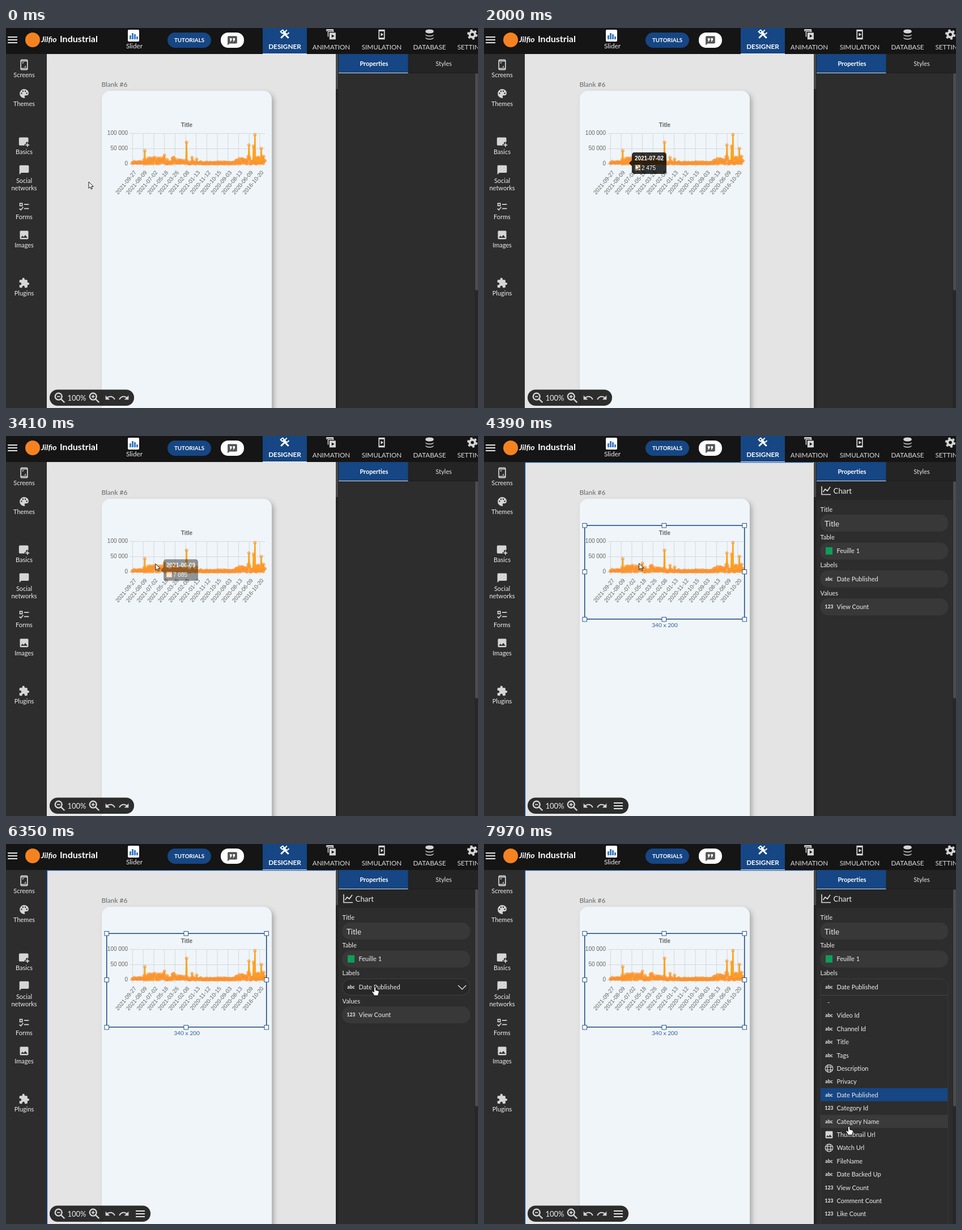
Animation of 833x672 px, one loop 8 s. Source, as an HTML page:

```html
<!DOCTYPE html>
<html lang="en">
<head>
<meta charset="utf-8">
<title>Chart designer</title>
<style>
  html, body { margin: 0; height: 100%; overflow: hidden; background: #2d2d2d; }
  svg { display: block; width: 100vw; height: 100vh; font-family: Lato, sans-serif; }
  .chart text { font-family: "Liberation Sans", Arial, sans-serif; font-size: 10px; fill: #666; }
  .chart .tip text { fill: #fff; }
</style>
</head>
<body>
<svg id="stage" viewBox="0 0 833 672"></svg>
<script>
const BLUE = '#164683', PANEL = '#2d2d2d', ICON = '#d6d6d6';

// Drawing helpers
const rect = (x, y, w, h, fill, more = '') =>
  `<rect x="${x}" y="${y}" width="${w}" height="${h}" fill="${fill}" ${more}/>`;
const text = (x, y, str, size = 11, fill = '#eee', more = '') =>
  `<text x="${x}" y="${y}" font-size="${size}" fill="${fill}" ${more}>${str}</text>`;
const mid = (x, y, str, size, fill, more = '') => text(x, y, str, size, fill, 'text-anchor="middle" ' + more);
const line = (d, color = '#fff', width = 1, more = '') =>
  `<path d="${d}" fill="none" stroke="${color}" stroke-width="${width}" ${more}/>`;
const group = (id, body, more = '') => `<g id="${id}" ${more}>${body}</g>`;
// Icons are drawn on a 24-unit square centred on (x, y)
const icon = (x, y, body, size = 20, color = ICON) =>
  `<g transform="translate(${x - size / 2} ${y - size / 2}) scale(${size / 24})" fill="${color}" fill-rule="evenodd">${body}</g>`;
const path = d => `<path d="${d}"/>`;
const hole = (x, y) => `M${x - 1.5} ${y}a1.5 1.5 0 1 0 3 0a1.5 1.5 0 1 0-3 0z`;

const ICONS = {
  phone: line('M7 1.5H17Q19 1.5 19 3.5V20.5Q19 22.5 17 22.5H7Q5 22.5 5 20.5V3.5Q5 1.5 7 1.5ZM5 4H19M5 20H19', ICON, 2),
  palette: path('M12 2.5a9.5 9.5 0 0 0 0 19c1.6 0 2.1-1.5 1.2-2.6-.9-1.3 0-2.9 1.5-2.9H17c3 0 4.5-2.3 4.5-5 0-5-4.5-8.5-9.5-8.5z'
    + hole(6.5, 11.5) + hole(9.5, 6.8) + hole(14.5, 6.8) + hole(17.5, 11.5)),
  basics: path('M3 3H19Q21 3 21 5V13H16V17H13V20H3Q1 20 1 18V5Q1 3 3 3ZM18 15H20V18H23V20H20V23H18V20H15V18H18Z'),
  bubble: path('M2 22V4Q2 2 4 2H20Q22 2 22 4V16Q22 18 20 18H6Z'),
  forms: path('M12 6H22V8H12ZM12 15H22V17H12Z') + line('M3 5H8V10H3ZM2 16L5 19 10 13', ICON, 2),
  image: path('M5 3H19Q21 3 21 5V19Q21 21 19 21H5Q3 21 3 19V5Q3 3 5 3ZM8.5 13.5L5 18H19L14.5 12 11 16.5Z'),
  puzzle: path('M20.5 11H19V7q0-2-2-2h-4V3.5a2.5 2.5 0 0 0-5 0V5H4q-2 0-2 2v3.8h1.5a2.7 2.7 0 0 1 0 5.4H2V20q0 2 2 2h3.8v-1.5a2.7 2.7 0 0 1 5.4 0V22H17q2 0 2-2v-4h1.5a2.5 2.5 0 0 0 0-5z'),
  undo: path('M12.5 8C9.8 8 7.5 9 5.6 10.6L2 7v9h9l-3.6-3.6c4-3.4 11-2 12.7 3.6l2.4-.8C21 11 17 8 12.5 8z'),
  zoom: line('M3 9.5a6.5 6.5 0 1 0 13 0a6.5 6.5 0 1 0-13 0M14.5 14.5L21 21', ICON, 2.6),
  globe: line('M2.5 12a9.5 9.5 0 1 0 19 0a9.5 9.5 0 1 0-19 0M8 12a4 9.5 0 1 0 8 0a4 9.5 0 1 0-8 0M3 8.5H21M3 15.5H21', ICON, 1.7),
  tools: line('M3 21L15 9M21 21L8 8', '#fff', 4) + line('M13 6a4 4 0 0 0 6 5l3-3M13 6l4-4M2 6L7 2 11 6 6 10Z', '#fff', 2.5),
  stack: line('M2 5V1H16V5M1 2H15M5 17V5H18', ICON, 2) + path('M8 8H22V23H8ZM13 12V19L19 15.5Z'),
  play: line('M6 2H18V22H6ZM6 4H18M6 20H18', ICON, 2.2) + path('M10 8V16L16 12Z'),
  database: [4, 11, 18].map((y, i) => path(`M3 ${y}a9 3.5 0 0 ${i ? 0 : 1} 18 0v2a9 3.5 0 0 1-18 0z`)).join(''),
  gear: `<circle cx="12" cy="12" r="6" fill="none" stroke="${ICON}" stroke-width="5"/>
    <circle cx="12" cy="12" r="9.5" fill="none" stroke="${ICON}" stroke-width="4" stroke-dasharray="5 4.95"/>`,
};

const typeIcon = (kind, y) => ICONS[kind] ? icon(609, y, ICONS[kind], 17)
  : kind === 'sheet' ? rect(603, y - 6.5, 12, 13, '#0f9d58')
  : mid(609, y + 3, kind, 8.5, ICON, 'font-weight="900"');
const entry = (y, kind, str) => typeIcon(kind, y) + text(622.5, y + 4, str);
const menuLines = (x, y, w) => line(`M${x} ${y}h${w}m-${w} 5h${w}m-${w} 5h${w}`, '#e4e4e4', 2);

function header() {
  const tabs = [[574, 'ANIMATION', 'stack'], [663, 'SIMULATION', 'play'], [747.5, 'DATABASE', 'database'], [823, 'SETTINGS', 'gear']];
  const bars = [7, 11, 9, 5].map((h, i) => rect(218 + 4 * i, 20 - h, 3, h, '#3b78c4')).join('');
  return rect(0, 0, 833, 46, '#151515') + menuLines(3, 16, 17)
    + '<circle cx="47" cy="21" r="13" fill="#f58220"/>'
    + text(62, 25, 'Jilfio', 14, '#fff', 'font-style="italic" font-weight="bold"')
    + text(95, 25, 'Industrial', 16, '#fff', 'font-weight="bold"')
    + rect(215, 3, 20, 21, '#fff', 'rx="2"') + bars
    + mid(226.5, 36, 'Slider', 11.7, '#eee')
    + rect(285, 8, 77, 27, BLUE, 'rx="13.5"') + mid(323.5, 25, 'TUTORIALS', 9.8, '#fff', 'font-weight="bold"')
    + rect(379, 8, 41, 27, '#fff', 'rx="13"') + icon(399.5, 22.5, ICONS.bubble, 20, '#555')
    + '<path d="M395 18h3.5v3l-2 3h-1.5l1-3h-1zm5.5 0h3.5v3l-2 3h-1.5l1-3h-1z" fill="#fff"/>'
    + rect(453, 0, 78, 46, BLUE) + rect(453, 45, 78, 1, '#e8eef6')
    + icon(492, 11, ICONS.tools, 18, '#fff') + mid(492, 36.5, 'DESIGNER', 11.8, '#fff', 'font-weight="bold"')
    + tabs.map(([x, name, key]) => icon(x, 11.5, ICONS[key], 19)
      + (key === 'gear' ? text(796.5, 38, name, 11.7, '#ddd') : mid(x, 38, name, 11.7, '#ddd'))).join('');
}

function sidebar() {
  const items = [[65, 'phone', 'Screens'], [116, 'palette', 'Themes'], [201, 'basics', 'Basics'], [251, 'bubble', 'Social'],
    [316, 'forms', 'Forms'], [366, 'image', 'Images'], [451, 'puzzle', 'Plugins']];
  return rect(0, 46, 72, 626, PANEL)
    + items.map(([y, key, name]) => icon(32, y, ICONS[key])
      + mid(32, y + (key === 'bubble' ? 23 : 22), name, 11, '#eee')).join('')
    + mid(32, 286.5, 'networks', 11, '#eee')
    + line('M29.5 63v-2h2M34.5 67v2h-2', ICON, 1.2);
}

function chartSeries() {
  let seed = 11;
  const random = () => (seed = (seed * 16807) % 2147483647) / 2147483647;
  // [right edge, lowest, highest] in pixels above the axis
  const bands = [[243, 1, 5], [302, 0, 11], [318, 1, 7], [345, 0, 5], [405, 0, 3], [425, 0, 9], [460, 0, 13]];
  const spikes = [[245, 23], [280, 15], [318.5, 38], [328.5, 11], [336, 8], [412, 9], [429, 33], [437, 31], [439, 51.5], [450.5, 27], [455, 13]];
  const points = Array.from({ length: 290 }, (_, i) => {
    const x = 223 + i * 0.81;
    const [, low, high] = bands.find(b => x < b[0]);
    const spike = spikes.find(s => Math.abs(s[0] - x) < 0.406);
    return [x, 240 - (spike ? spike[1] : low + random() ** 2 * (high - low))];
  });
  return line('M' + points.map(p => p.map(v => v.toFixed(1))).join('L'), '#fba41f', 2.5, 'stroke-linejoin="round"')
    + points.map(([x, y]) => `<circle cx="${x.toFixed(1)}" cy="${y.toFixed(1)}" r="2.5" fill="#ff9f4033" stroke="#fb9030" stroke-width=".8"/>`).join('');
}

function chart() {
  const dates = ['2021-09-27', '2021-08-09', '2021-07-02', '2021-05-18', '2021-03-26', '2021-02-08', '2021-01-13',
    '2020-11-12', '2020-10-15', '2020-09-03', '2020-08-13', '2020-06-09', '2016-10-20'];
  const columns = dates.map((date, i) => {
    const x = 223.5 + 18.7 * i;
    return line(`M${x} 186V246`, '#d3d9dc')
      + `<text transform="translate(${x + 4.5} 253.5) rotate(-50)" text-anchor="end" dy=".35em">${date}</text>`;
  }).join('');
  const rows = ['100 000', '50 000', '0'].map((label, i) =>
    line(`M218 ${186 + 27 * i}.5H457`, i < 2 ? '#d3d9dc' : '#b9c0c4')
    + text(215, 189 + 27 * i, label, 10, '#666', 'text-anchor="end"')).join('');
  return mid(319, 175, 'Title', 10, '#666', 'font-weight="bold"') + columns + rows + chartSeries();
}

function selection() {
  const handles = [[178, 158], [318, 158], [460, 158], [178, 240], [460, 240], [178, 324], [318, 324], [460, 324]];
  return line('M72.6 672V46.6H581', '#1f5cb0', 1.2) + line('M177.7 158.3H459.7V323.7H177.7Z', BLUE, 1.5)
    + handles.map(([x, y]) => rect(x - 4, y - 3.5, 7.5, 7.5, '#fff', `stroke="${BLUE}" stroke-width=".9"`)).join('')
    + mid(319, 338, '340 x 200', 10.2, '#315f9c');
}

const toolbar = () =>
  `<rect id="toolbar" x="77" y="639.5" width="149" height="28.5" rx="14" fill="${PANEL}"/>`
  + icon(95, 654, ICONS.zoom + line('M6.5 9.5h6', ICON, 2), 22) + text(108.5, 659, '100%', 13)
  + icon(156, 654, ICONS.zoom + line('M6.5 9.5h6M9.5 6.5v6', ICON, 2), 22) + line('M169.5 640V668', '#222')
  + icon(184, 654, ICONS.undo) + `<g transform="matrix(-1 0 0 1 416 0)">${icon(208, 654, ICONS.undo)}</g>`
  + group('menu', menuLines(229, 649, 16));

const sideTabs = () => rect(582, 46, 5, 626, '#252525') + rect(582, 46, 4, 62, '#484848')
  + rect(587, 46, 246, 626, PANEL) + rect(709, 46, 124, 33, '#242424') + rect(587, 79, 246, 1, '#1c1c1c')
  + rect(587, 46, 122.5, 33, BLUE) + rect(587, 79, 122.5, 1, '#d5deea')
  + mid(649.5, 67, 'Properties', 10.8, '#fff', 'font-weight="bold"') + mid(772.5, 67, 'Styles', 11, '#e4e4e4')
  + rect(827, 80, 6, 592, '#272727') + rect(828, 80, 5, 384, '#4c4c4c', 'rx="2"');

function properties() {
  const fields = [['Title'], ['Table', 'sheet', 'Feuille 1'], ['Labels', 'abc', 'Date Published'], ['Values', '123', 'View Count']];
  return rect(587, 80, 240, 33, '#262626') + line('M596 89V103.5H612M598.5 99L602 94 606 97 611 90', '#e0e0e0', 1.6)
    + text(616.5, 101.5, 'Chart', 13.3)
    + fields.map(([label, kind, value], i) => {
      const y = 154 + 49.4 * i;
      const box = rect(593.5, y - 15, 225.5, 30, '#383838', 'rx="14"');
      const hovered = i === 2 ? group('hover', rect(594, y - 14.5, 224.5, 29, '#282828', 'rx="14" stroke="#3f3f3f"')) : '';
      return text(593.5, y - 20.5, label) + box + hovered
        + (kind ? entry(y - 0.2, kind, value) : text(601, y + 6, label, 13.3));
    }).join('');
}

function dropdown() {
  const rows = [['', ''], ['abc', 'Video Id'], ['abc', 'Channel Id'], ['abc', 'Title'], ['abc', 'Tags'], ['globe', 'Description'],
    ['abc', 'Privacy'], ['abc', 'Date Published'], ['123', 'Category Id'], ['abc', 'Category Name'], ['image', 'Thumbnail Url'],
    ['globe', 'Watch Url'], ['abc', 'FileName'], ['abc', 'Date Backed Up'], ['123', 'View Count'], ['123', 'Comment Count'], ['123', 'Like Count']];
  return `<path d="M594 680V252Q594 239 608 239H805Q818.5 239 818.5 252V680Z" fill="${PANEL}" stroke="#383838"/>`
    + line('M594 267.5H818', '#454545') + entry(253, 'abc', 'Date Published')
    + '<rect id="rowHover" x="594" width="224" height="23.4" fill="#3a3a3a"/>'
    + rect(594, 431.6, 224, 23.4, BLUE)
    + rows.map(([kind, name], i) => name ? entry(280 + 23.4 * i, kind, name) : text(606, 284, '-')).join('');
}

const tooltip = () => '<path d="M-5 19L0 14V5Q0 0 5 0H56Q61 0 61 5V33Q61 38 56 38H5Q0 38 0 33V24Z" fill="#000" fill-opacity=".8"/>'
  + '<text id="tipDate" x="5" y="14" font-weight="bold"></text>'
  + rect(5.5, 22.5, 9, 9, '#ffe0cf', 'stroke="#ff9f40"') + '<text id="tipValue" x="17" y="31"></text>';

const stage = document.getElementById('stage');
stage.innerHTML = `<defs><filter id="shadow" x="-10%" y="-10%" width="120%" height="120%">
    <feDropShadow dx="4" dy="4" stdDeviation="4" flood-opacity=".25"/></filter></defs>`
  + rect(72, 46, 510, 626, '#e4e4e4') + text(168.5, 104, 'Blank #6', 11.9, '#666')
  + rect(169, 111, 300, 620, '#eff5f8', 'rx="15" filter="url(#shadow)"')
  + group('chart', chart(), 'class="chart"') + group('selection', selection())
  + group('tipLayer', group('tip', tooltip(), 'class="tip"'), 'class="chart"')
  + toolbar() + sideTabs() + group('properties', properties()) + group('dropdown', dropdown())
  + group('chevron', line('M798 250L805 257 812 250', '#e4e4e4', 1.3))
  + header() + sidebar()
  + group('arrow', '<path d="M0 0V11.5L2.7 9 4.5 13 6.3 12.2 4.6 8.4H8.2Z" fill="#fff" stroke="#000" stroke-width=".9"/>')
  + group('hand', '<path d="M-1.5.8Q0-.8 1.5.8V5.5L6 6.5Q7.6 7 7.3 9L6 12.5V15H-2V13L-5 9Q-5.5 7-3.5 7.5L-1.5 9Z" fill="#fff" stroke="#000" stroke-width=".8"/>');

// Motion: [time, x, y]
const CURSOR = [[0, 146, 272], [200, 146, 272], [400, 160, 267], [850, 219, 250], [1050, 229, 246], [1110, 230, 245], [1250, 236, 240],
  [1870, 261, 240], [2000, 267, 240], [2270, 246, 241], [2730, 285, 245], [3150, 285, 245], [3410, 264, 226], [3530, 254, 217],
  [3670, 264, 226], [4320, 264, 226], [4390, 273, 225], [4800, 523, 234], [5130, 523, 234], [5600, 638, 254], [5740, 645, 244],
  [6149, 645, 244], [6150, 652, 248], [6349, 652, 248], [6350, 651, 253], [6890, 651, 253], [7360, 660, 437], [7700, 660, 437],
  [7970, 644, 499.5], [8000, 644, 499.5]];
const TIP = [[0, 239, 219], [1250, 239, 219], [1870, 256, 220], [2000, 261, 220], [2270, 244, 219], [2730, 282, 219],
  [3200, 282, 219], [3340, 278, 218], [8000, 278, 218]];
const TIP_TEXT = [[0, '2021-08-26', '4 680'], [1480, '2021-07-20', '3 912'], [1800, '2021-07-02', '2 475'],
  [2130, '2021-07-26', '5 316'], [2400, '2021-06-24', '3 240'], [2600, '2021-06-09', '7 085']];

const ramp = (t, from, to) => Math.min(1, Math.max(0, (t - from) / (to - from)));
function along(keys, t) {
  const i = keys.findIndex(k => k[0] > t);
  const [t0, x0, y0] = keys[i - 1], [t1, x1, y1] = keys[i];
  const p = ramp(t, t0, t1);
  return [x0 + (x1 - x0) * p, y0 + (y1 - y0) * p];
}
const el = id => document.getElementById(id);
const show = (id, on) => el(id).setAttribute('visibility', on ? 'visible' : 'hidden');
const place = (id, [x, y]) => el(id).setAttribute('transform', `translate(${x} ${y})`);

function draw() {
  const t = performance.now() % 8000;
  const [x, y] = along(CURSOR, t);
  const selected = t >= 3870, open = t >= 6420;
  const overField = selected && x > 594 && y > 238 && y < 268;
  const overRow = Math.round((y - 280) / 23.4);

  place('arrow', [x, y]);
  place('hand', [x, y]);
  show('arrow', !overField && !open);
  show('hand', overField || open);

  const [, date, value] = TIP_TEXT.findLast(k => k[0] <= t);
  place('tip', along(TIP, t));
  el('tip').setAttribute('opacity', Math.min(ramp(t, 1180, 1380), 1 - ramp(t, 3340, 3480)));
  el('tipDate').textContent = date;
  el('tipValue').textContent = value;

  show('selection', selected);
  show('menu', selected);
  el('toolbar').setAttribute('width', selected ? 178 : 149);
  show('properties', t >= 3930);
  show('hover', t >= 3930 && overField);
  show('chevron', overField);
  show('dropdown', open);
  show('rowHover', open && overRow >= 0);
  el('rowHover').setAttribute('y', 268.3 + 23.4 * overRow);
  requestAnimationFrame(draw);
}
draw();
</script>
</body>
</html>
```
